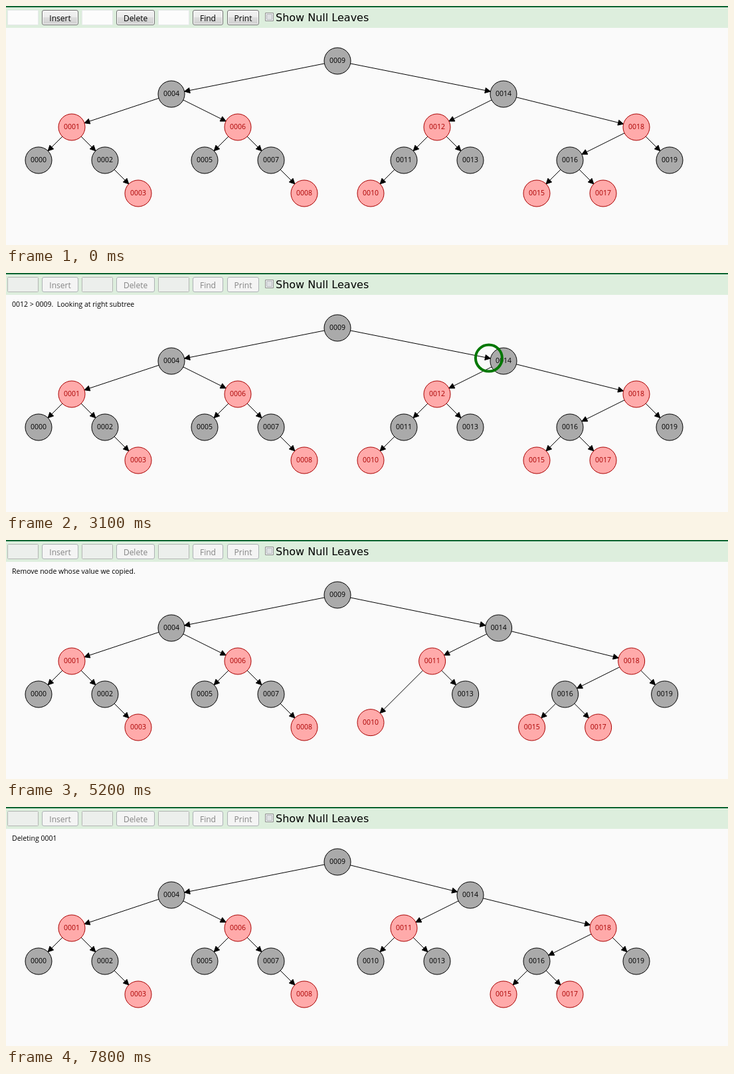
Recreate the animation shown at these times as an HTML page with a canvas. Size 1087 px wide and 361 px high, loop 8 s.

```html
<!DOCTYPE html>
<html lang="en">
<head>
<meta charset="utf-8">
<title>Red-black tree deletion</title>
<style>
html, body { margin: 0; width: 100%; height: 100%; overflow: hidden; background: #fafafa; }
canvas { display: block; }
</style>
</head>
<body>
<canvas id="stage" width="1087" height="361"></canvas>
<script>
const ctx = document.getElementById('stage').getContext('2d');
const LOOP = 8000, TICK = 100, MOVE = 340, RADIUS = 20;
const SMALL = '10.5px "Open Sans", "Noto Sans", sans-serif';
const CONTROL = '12px "Open Sans", "Noto Sans", sans-serif';

// parent[value] gives the value of the parent node
const parent = [1, 4, 1, 2, 9, 6, 4, 6, 7, null, 11, 12, 14, 12, 9, 16, 18, 16, 14, 18];
const red = new Set([1, 3, 6, 8, 10, 12, 15, 17, 18]);

const RELINK = 4820, RESIZE = 5150, DONE = 5900;
const messages = [
  [0, ''],
  [2200, 'Deleting 0012'],
  [2450, '0012 > 0009.  Looking at right subtree'],
  [3135, '0012 < 0014.  Looking at left subtree'],
  [3815, '0012 == 0012.  Found node to delete'],
  [4140, 'Node to delete has two childern.\nFind largest node in left subtree.'],
  [4510, 'Copy largest value of left subtree into node to delete.'],
  [RELINK, 'Remove node whose value we copied.'],
  [5500, 'Coloring child of deleted node black.'],
  [DONE, ''],
  [7800, 'Deleting 0001']
];
const fieldText = [[0, ''], [1600, '1'], [1700, '12'], [2200, ''], [7200, '1'], [7800, '']];
const pointer = [
  [0, ''], [300, 'field3'], [400, 'Delete'], [500, 'field2'], [1900, 'Delete'],
  [6400, 'field2'], [7400, 'Delete']
];
const highlights = [[2450, 2790, 9], [3135, 3480, 14], [3815, 4140, 12]];
const rings = [[2790, 3135, 9, 14], [3480, 3815, 14, 12], [4140, RELINK, 12, 11]];

const latest = (list, t) => list.filter(([start]) => start <= t).pop()[1];
const within = (t, a, b) => t >= a && t < b;
const progress = (t, start) => Math.max(0, Math.min(1, (t - start) / MOVE));
const lerp = (a, b, k) => a + (b - a) * k;
const pad = v => String(v).padStart(4, '0');
const depth = v => parent[v] === null ? 0 : 1 + depth(parent[v]);

function position(v, t) {
  const k = progress(t, RESIZE);
  return {
    x: 49 + 50 * v - (v >= 12 ? 50 * k : 0),
    y: 83 + 50 * depth(v) - (v === 10 ? 50 * k : 0)
  };
}

function between(a, b, k) {
  return { x: lerp(a.x, b.x, k), y: lerp(a.y, b.y, k) };
}

function text(str, x, y, font, color = '#000', align = 'left') {
  ctx.font = font;
  ctx.fillStyle = color;
  ctx.textAlign = align;
  ctx.fillText(str, x, y);
}

function disc(p, r, fill, stroke, width = 1) {
  ctx.beginPath();
  ctx.arc(p.x, p.y, r, 0, 2 * Math.PI);
  if (fill) { ctx.fillStyle = fill; ctx.fill(); }
  if (stroke) { ctx.strokeStyle = stroke; ctx.lineWidth = width; ctx.stroke(); }
}

function arrow(from, to) {
  const a = Math.atan2(to.y - from.y, to.x - from.x);
  const ux = Math.cos(a), uy = Math.sin(a);
  const tip = { x: to.x - RADIUS * ux, y: to.y - RADIUS * uy };
  ctx.strokeStyle = ctx.fillStyle = '#000';
  ctx.lineWidth = 1;
  ctx.beginPath();
  ctx.moveTo(from.x + RADIUS * ux, from.y + RADIUS * uy);
  ctx.lineTo(tip.x, tip.y);
  ctx.stroke();
  ctx.beginPath();
  ctx.moveTo(tip.x, tip.y);
  for (const side of [4, -4]) ctx.lineTo(tip.x - 8 * ux - side * uy, tip.y - 8 * uy + side * ux);
  ctx.closePath();
  ctx.fill();
  ctx.stroke();
}

function drawTree(t) {
  const removed = t >= RESIZE, relinked = t >= RELINK;
  const values = parent.map((_, v) => v).filter(v => !(removed && v === 11));
  const at = v => position(v, t);

  for (const v of values) {
    if (parent[v] === null || (relinked && v === 11)) continue;
    arrow(at(relinked && v === 10 ? 12 : parent[v]), at(v));
  }
  // the highlight swells and shrinks by one pixel every 210 ms
  for (const [start, end, v] of highlights) {
    if (within(t, start, end)) disc(at(v), RADIUS + 3 + Math.abs(t - 2920) / 210, '#f00');
  }
  for (const v of values) {
    const p = at(v), isRed = red.has(v) && !(v === 10 && t >= DONE);
    const ink = isRed ? '#a00' : '#000';
    disc(p, RADIUS, isRed ? '#faa' : '#aaa', ink);
    if (v === 12 && within(t, 4510, RELINK)) continue;
    text(pad(v === 12 && relinked ? 11 : v), p.x, p.y + 3, SMALL, ink, 'center');
  }
  for (const [start, end, a, b] of rings) {
    if (within(t, start, end)) disc(between(at(a), at(b), progress(t, start)), RADIUS, null, '#070', 4);
  }
  if (within(t, 4510, RELINK)) {
    const p = between(at(11), at(12), progress(t, 4510));
    text('0011', p.x, p.y + 3, SMALL, '#000', 'center');
  }
}

function box(x, y, w, h, radius, fill, stroke) {
  ctx.beginPath();
  ctx.roundRect(x + .5, y + .5, w - 1, h - 1, radius);
  ctx.fillStyle = fill;
  ctx.fill();
  if (stroke) { ctx.strokeStyle = stroke; ctx.lineWidth = 1; ctx.stroke(); }
}

const buttonLooks = {
  normal: ['#707070', '#f2f2f2', '#ebebeb', '#dddddd', '#cfcfcf'],
  hover: ['#3c7fb1', '#eaf6fd', '#d9f0fc', '#bee6fd', '#a7d9f5'],
  pressed: ['#2c628b', '#e5f4fc', '#c4e5f6', '#98d1ef', '#68b3db']
};

function button(label, x, w, state) {
  if (state === 'disabled') {
    box(x, 6, w, 23, 2.5, '#f4f4f4', '#adb2b5');
  } else {
    const [border, ...stops] = buttonLooks[state];
    const shade = ctx.createLinearGradient(0, 7, 0, 28);
    stops.forEach((c, i) => shade.addColorStop([0, .5, .5, 1][i], c));
    box(x, 6, w, 23, 2.5, '#fcfcfc', border);
    ctx.fillStyle = shade;
    ctx.fillRect(x + 2, 8, w - 4, 19);
  }
  text(label, x + w / 2, 23, CONTROL, state === 'disabled' ? '#838383' : '#000', 'center');
}

function drawToolbar(t) {
  const disabled = within(t, 2200, DONE) || t >= 7800;
  const hovered = latest(pointer, t);
  const focused = within(t, 600, 2100) || within(t, 6400, 7600);
  const pressed = within(t, 2100, 2200) || within(t, 7600, 7800);

  ctx.fillStyle = '#ddeedd';
  ctx.fillRect(0, 0, 1087, 33);
  ctx.fillStyle = '#006633';
  ctx.fillRect(0, 0, 1087, 2);

  [2, 114, 229].forEach((x, i) => {
    const name = 'field' + (i + 1);
    let border = '#e6e9ea';
    if (disabled) border = '#b4b6b4';
    else if (hovered === name) border = '#86b7df';
    else if (focused && i === 1) border = '#5f9ccd';
    box(x, 6, 47, 23, 1, disabled ? '#ecefec' : '#fcfcfc', border);
  });

  for (const [label, x, w] of [['Insert', 54, 55], ['Delete', 166, 58], ['Find', 281, 46], ['Print', 333, 48]]) {
    let state = 'normal';
    if (disabled) state = 'disabled';
    else if (label === hovered) state = pressed ? 'pressed' : 'hover';
    button(label, x, w, state);
  }

  const typed = latest(fieldText, t);
  text(typed, 118, 22, CONTROL);
  const caret = [[900, 1300], [1600, 2100], [6400, 6800], [7200, 7600]];
  if (caret.some(([a, b]) => within(t, a, b))) {
    ctx.fillStyle = '#000';
    ctx.fillRect(117 + 7 * typed.length, 9, 1, 17);
  }

  box(390, 10, 13, 13, 0, '#f4f4f4', '#8e8f8f');
  box(392, 12, 9, 9, 0, '#dfe1e3', '#b4b9be');
  text('Show Null Leaves', 406, 23, '16px "DejaVu Sans", Verdana, sans-serif');
}

function draw(t) {
  ctx.fillStyle = '#fafafa';
  ctx.fillRect(0, 0, 1087, 361);
  drawTree(t);
  latest(messages, t).split('\n').forEach((line, i) => text(line, 9, 51 + 12 * i, SMALL));
  drawToolbar(t);
}

const began = performance.now();
function frame() {
  const t = (performance.now() - began) % LOOP;
  draw(Math.floor(t / TICK) * TICK);
  requestAnimationFrame(frame);
}
frame();
</script>
</body>
</html>
```
